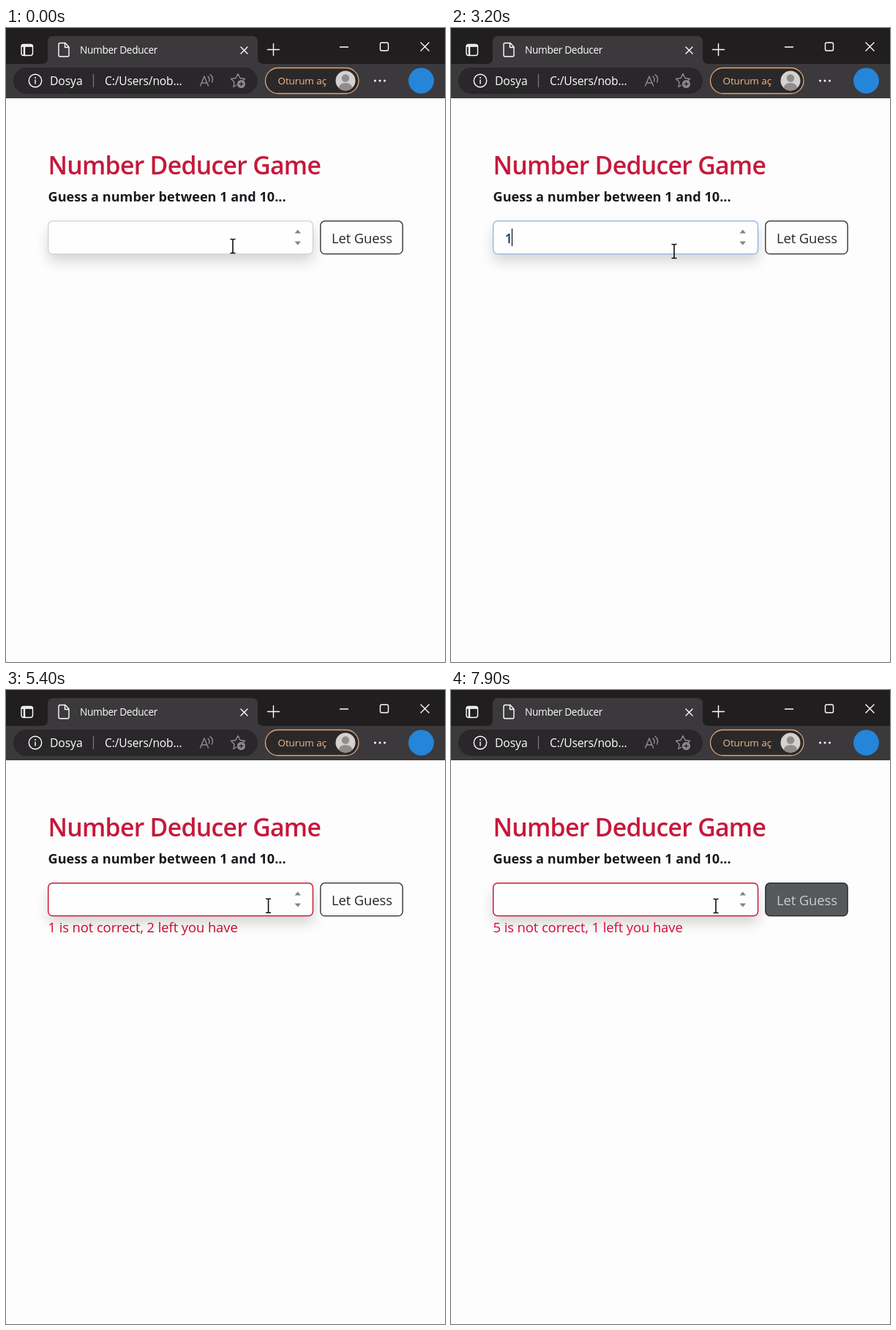
Animation of 600 by 866 pixels, one loop 8000 ms. Source, as an HTML page:

```html
<!DOCTYPE html>
<html lang="en">
<head>
<meta charset="utf-8">
<title>Number Deducer</title>
<style>
  html, body { margin: 0; width: 100%; height: 100%; overflow: hidden; background: #fefdfe; }
  svg { display: block; width: 100%; height: 100%; }
  text { font-family: "Open Sans", "Noto Sans", sans-serif; }
  .line { fill: none; stroke: #fff; stroke-width: 1.4; stroke-linecap: round; stroke-linejoin: round; }
  .dim { stroke: #8f8d8f; }
  .ui { fill: #fff; }
  #browser text { font-weight: 500; }
  .body { font-size: 18.4px; letter-spacing: -.08px; }
</style>
</head>
<body>
<svg viewBox="0 0 600 866">
  <defs>
    <filter id="soft" x="-20%" y="-100%" width="140%" height="300%">
      <feGaussianBlur stdDeviation="9.300"/>
    </filter>
    <clipPath id="face"><circle cx="464" cy="72" r="13.5"/></clipPath>
  </defs>
  <rect width="600" height="866" fill="#fefdfe"/>

  <g id="browser">
    <rect width="600" height="50" fill="#201e1f"/>
    <path d="M0 49H49Q57 49 57 41V19Q57 11 65 11H336Q344 11 344 19V41Q344 49 352 49H600V96H0Z" fill="#3b393b"/>

    <rect class="line" x="21" y="22.500" width="15.500" height="15" rx="3"/>
    <path class="line" d="M22 24.500H36M25 25V37" style="stroke-width:2.400"/>
    <path class="line" d="M74 20.500H81L86 26V37Q86 39 84 39H74Q72 39 72 37V22.500Q72 20.500 74 20.500ZM80.500 21V26.500H86"/>
    <text class="ui" x="101" y="35" font-size="13.7" letter-spacing="-.35">Number Deducer</text>
    <path class="line" d="M321 26L330 35M330 26L321 35"/>
    <path class="line" d="M357.500 29.500H373.500M365.500 21.500V37.500"/>
    <path class="line" d="M456.500 26H467.500M567 20L578 31M578 20L567 31"/>
    <rect class="line" x="511.500" y="20" width="11" height="11" rx="2"/>

    <rect x="10" y="54" width="334" height="36" rx="18" fill="#292729"/>
    <circle class="line" cx="40" cy="72" r="8.700"/>
    <path class="line" d="M40 71V76"/>
    <circle class="ui" cx="40" cy="68" r="1"/>
    <text class="ui" x="60" y="78" font-size="15.7" letter-spacing="-.1">Dosya</text>
    <path d="M119.500 63V81" stroke="#777577" stroke-width="1.300"/>
    <text class="ui" x="135" y="78" font-size="15.6" letter-spacing="-.15">C:/Users/nob...</text>
    <path class="line dim" d="M265.500 79L271 66L276.500 79M267.500 75H274.500M276 66Q279 69 277.500 73M279 63.500Q284.500 68 281.500 74"/>
    <path class="line dim" d="M315 78L311 80.500L312 74L307.500 69.500L314 68.500L317 62.500L320 68.500L326.500 69.500L324.500 71.500"/>
    <circle cx="321.500" cy="76.500" r="5.500" fill="#8f8d8f"/>
    <path d="M318.500 76.500H324.500M321.500 73.500V79.500" stroke="#292729" stroke-width="1.300"/>

    <rect x="354.500" y="54.500" width="127.500" height="35" rx="17.500" fill="#2b2829" stroke="#dba679" stroke-width="1.300"/>
    <text x="371.500" y="77" font-size="13.5" letter-spacing="-.1" fill="#efb98c">Oturum aç</text>
    <g clip-path="url(#face)">
      <rect x="450" y="58" width="28" height="28" fill="#d4d1d0"/>
      <circle cx="464" cy="68.500" r="5.200" fill="#908d8c"/>
      <ellipse cx="464" cy="81" rx="9" ry="6" fill="#908d8c"/>
    </g>
    <g class="ui">
      <circle cx="504.500" cy="72" r="1.500"/><circle cx="511" cy="72" r="1.500"/><circle cx="517.500" cy="72" r="1.500"/>
    </g>
    <circle cx="567.500" cy="72" r="17.500" fill="#2585d8"/>
  </g>

  <text x="57.500" y="200" font-size="33.800" font-weight="600" letter-spacing="-.72" fill="#c5193b">Number Deducer Game</text>
  <text x="57.500" y="236.500" font-size="18.1" font-weight="700" letter-spacing=".03" fill="#16191d">Guess a number between 1 and 10...</text>

  <rect x="58" y="273.500" width="362" height="45" rx="6" fill="#000" opacity=".16" filter="url(#soft)"/>
  <rect id="field" x="57.700" y="263.700" width="361.800" height="44.900" rx="6" fill="#fefefe"/>
  <path id="spin" d="M394.500 280.500L398.800 275.500L403 280.500ZM394.500 291.500L398.800 296.500L403 291.500Z" fill="#858385"/>
  <text id="value" class="body" x="73.500" y="293.500" font-weight="600"></text>
  <path id="caret" stroke="#16202c" stroke-width="1.300"/>
  <rect id="button" x="429.800" y="263.700" width="112.300" height="44.900" rx="6" stroke="#212529" stroke-width="1.300"/>
  <text id="label" class="body" x="445" y="293.500">Let Guess</text>
  <text id="note" class="body" x="57.500" y="331"></text>

  <g id="pointer" stroke-linejoin="round">
    <path id="beam" d="M-3.500 -9.500H-1L0 -8.500L1 -9.500H3.500M0 -8.500V8.500M-3.500 9.500H-1L0 8.500L1 9.500H3.500" fill="none" stroke="#111" stroke-width="1.600"/>
    <path id="hand" fill="#fff" stroke="#111" stroke-width="1.200"
      d="M-2 1.500Q-2 -1 0 -1Q2 -1 2 1.500V9Q4.500 7.500 5.500 10Q8 8.800 8.700 11Q11.500 10.300 11.500 13.500V18Q11.500 21 9.500 23.500V26.500H-.500V24Q-3.500 20.500 -7 15.500Q-8.500 13 -6.500 12.300Q-5 11.800 -2 15.500Z"/>
    <path id="arrow" d="M0 0V16.500L4 13L6.500 19L9 18L6.500 12H12Z" fill="#fff" stroke="#111"/>
  </g>
</svg>

<script>
const LOOP = 8000, STEP = 100, BLINK = 530;
const ui = {};
for (const id of ['field', 'spin', 'value', 'caret', 'button', 'label', 'note', 'pointer', 'beam', 'hand', 'arrow'])
  ui[id] = document.getElementById(id);

// Pointer hotspot: time, x, y
const path = [
  [0, 310, 298], [100, 310, 298], [500, 305, 305], [3300, 305, 305],
  [3800, 417, 278], [4100, 460, 287], [5000, 460, 287], [5450, 355, 295],
  [6700, 355, 295], [7100, 460, 287], [7840, 460, 287], [7900, 362, 295], [LOOP, 362, 295]
];
const focusTime = 1150, typeTime = 2000, guessTime = 4450;
const refocusTime = 5650, retypeTime = 6550, reguessTime = 7300;

const clamp = v => Math.max(0, Math.min(1, v));
const mix = (a, b, k) => a + (b - a) * k;
const smooth = k => k * k * (3 - 2 * k);
const fade = (t, start) => clamp((t - start) / 150);
const between = (t, a, b) => t >= a && t < b;
const blend = (a, b, k) => `rgb(${a.map((v, i) => Math.round(mix(v, b[i], k)))})`;
const show = (el, on) => el.setAttribute('visibility', on ? 'visible' : 'hidden');
const set = (el, attrs) => { for (const k in attrs) el.setAttribute(k, attrs[k]); };

function pointerAt(t) {
  const i = path.findIndex(p => p[0] > t);
  const a = path[i - 1], b = path[i];
  const k = smooth((t - a[0]) / (b[0] - a[0]));
  return [mix(a[1], b[1], k), mix(a[2], b[2], k)];
}

function draw(t) {
  const [x, y] = pointerAt(t);
  const overField = x < 420, overButton = x >= 430;
  set(ui.pointer, { transform: `translate(${x.toFixed(1)} ${y.toFixed(1)})` });
  show(ui.beam, overField);
  show(ui.hand, overButton);
  show(ui.arrow, !overField && !overButton);

  const first = between(t, focusTime, guessTime);
  const second = between(t, refocusTime, reguessTime);
  const failed = t >= guessTime;
  const value = between(t, typeTime, guessTime) ? '1' : between(t, retypeTime, reguessTime) ? '5' : '';
  ui.value.textContent = value;
  set(ui.value, { fill: first ? '#123f70' : '#212529' });

  const lastKey = first ? (t < typeTime ? focusTime : typeTime) : (t < retypeTime ? refocusTime : retypeTime);
  const caretX = value ? 83.5 : 74.5;
  set(ui.caret, { d: `M${caretX} 274V298` });
  show(ui.caret, (first || second) && Math.floor((t - lastKey) / BLINK) % 2 === 0);

  const calm = blend([206, 210, 216], [134, 183, 232], fade(t, focusTime));
  set(ui.field, { stroke: failed ? '#c91b36' : calm, 'stroke-width': failed ? 1.5 : 1.3 });
  show(ui.spin, overField || first || second);

  const hover = fade(t, 3950) - fade(t, 5090) + fade(t, 6850) - fade(t, 7864);
  const dark = [33, 37, 41];
  set(ui.button, { fill: blend([254, 253, 254], dark, hover) });
  set(ui.label, { fill: blend(dark, [255, 255, 255], hover) });

  const again = t >= reguessTime;
  ui.note.textContent = !failed ? '' :
    again ? '5 is not correct, 1 left you have' : '1 is not correct, 2 left you have';
  set(ui.note, { fill: again ? '#dc0838' : '#cb0a28' });
}

const begin = performance.now();
function tick() {
  const t = (performance.now() - begin) % LOOP;
  draw(Math.floor(t / STEP) * STEP);
  requestAnimationFrame(tick);
}
tick();
</script>
</body>
</html>
```
